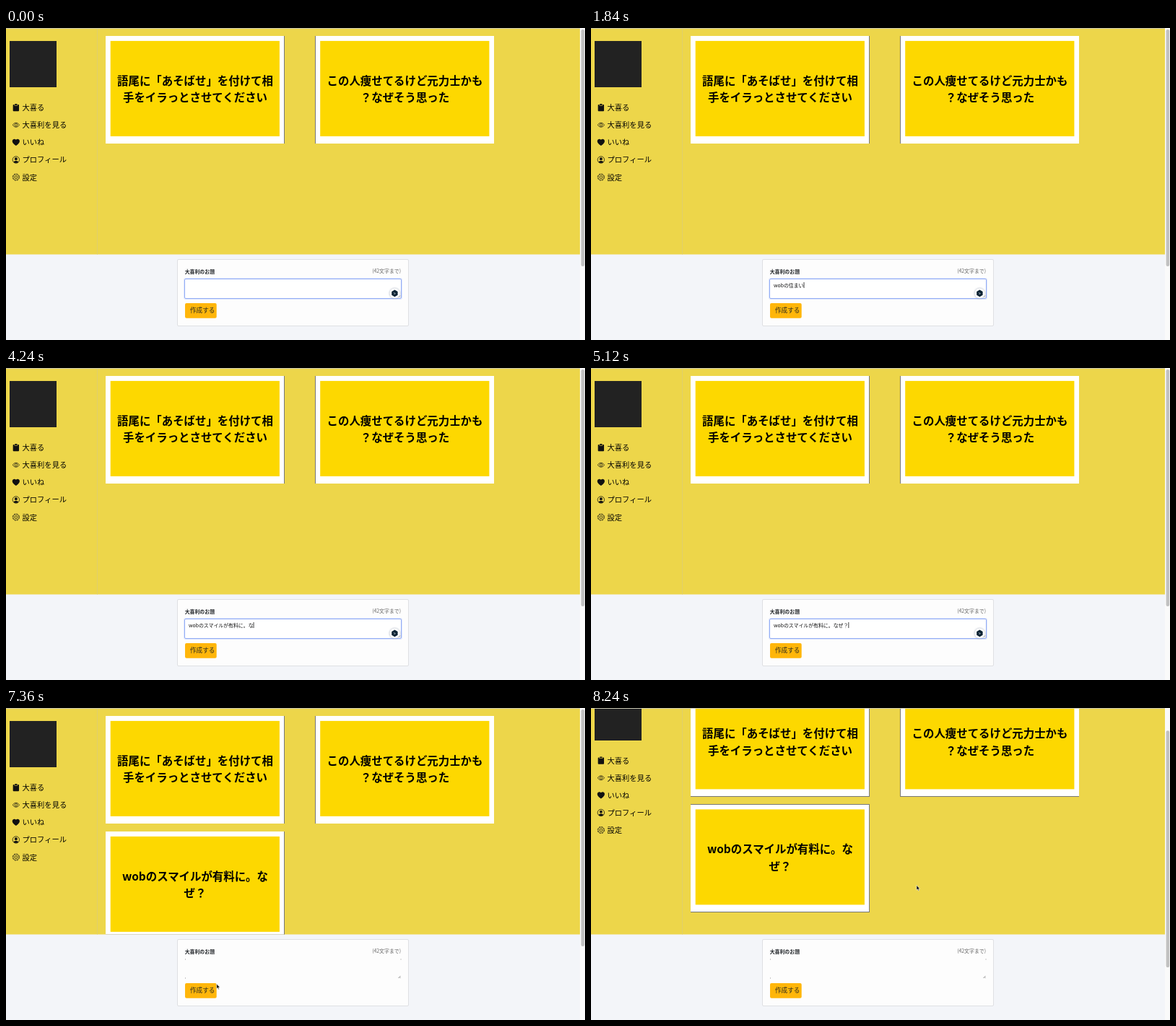
An HTML page that plays this animation: 802 px wide and 432 px high, repeating every 8320 ms.

```html
<!DOCTYPE html>
<html>
<head>
<meta charset="utf-8">
<style>
html, body { margin: 0; width: 100%; height: 100%; overflow: hidden; background: #f3f5f9; }
svg { display: block; font-family: "Noto Sans CJK JP", "Noto Sans CJK", "Noto Sans", sans-serif; }
.title { font-size: 15.43px; font-weight: 700; text-anchor: middle; }
.nav text { font-size: 10.29px; }
.icon { fill: none; stroke: #111; stroke-width: 1.2; }
.solid { fill: #111; stroke: none; }
.small { font-size: 6.9px; }
.crisp { shape-rendering: crispEdges; }
</style>
</head>
<body>
<svg width="802" height="432" viewBox="0 0 802 432">
  <defs>
    <clipPath id="view"><rect width="795" height="313.6"/></clipPath>
    <filter id="soft" x="-50%" y="-50%" width="200%" height="200%"><feGaussianBlur stdDeviation="1"/></filter>
  </defs>

  <g clip-path="url(#view)">
    <rect width="795" height="314" fill="#edd64a"/>
    <path d="M126.5 0V314" stroke="#e0cf6c"/>
    <g id="page">
      <rect class="crisp" x="5" y="17.7" width="65" height="64.6" fill="#222"/>
      <g id="nav" class="nav"></g>
      <g id="cards"></g>
    </g>
  </g>
  <path d="M0 .5H802" stroke="#c6c4b0"/>

  <rect x="795" width="7" height="432" fill="#fafafa"/>
  <rect id="thumb" x="796.6" width="4.6" height="328" rx="2.3" fill="#c1c1c1"/>

  <rect x="237.5" y="320.5" width="320" height="92" rx="1.5" fill="#fdfdfd" stroke="#dfe0e3"/>
  <text class="small" x="247.7" y="340.2" font-weight="700" fill="#212529">大喜利のお題</text>
  <text class="small" x="547" y="338.6" text-anchor="end" fill="#666">(42文字まで)</text>

  <path d="M248 348h1M546.5 348h1M248 374h1M543.5 374l3-3M545.5 374l1-1" stroke="#777" stroke-width=".8"/>
  <g id="focus">
    <rect x="246.5" y="346.5" width="302" height="29" rx="2" fill="none" stroke="#dbe4fd"/>
    <rect x="247.5" y="347.5" width="300" height="27" rx="1.5" fill="#fff" stroke="#93adf4"/>
    <path d="M543.5 373l3-3M545.5 373l1-1" stroke="#777" stroke-width=".6"/>
  </g>
  <text id="typed" class="small" x="253" y="358.5" fill="#111"></text>
  <path id="caret" stroke="#111" stroke-width=".8"/>
  <g id="badge" transform="translate(538.4 367.4)">
    <circle r="7.4" fill="#9aa3b5" opacity=".6" filter="url(#soft)"/>
    <circle r="6.9" fill="#fff"/>
    <path id="hex" d="M0-4.8l4.2 2.4v4.8L0 4.8l-4.2-2.4v-4.8z"/>
    <path d="M-1.6-1L1 .3l-2 1" fill="none" stroke="#dfe6ea" stroke-width=".6"/>
  </g>

  <rect id="ring" x="247" y="380" width="45.6" height="22.6" rx="2.5" fill="none" stroke="#86aef0" stroke-width="1.8"/>
  <rect id="button" x="248" y="381" width="43.7" height="20.8" rx="2"/>
  <text x="255" y="394.4" font-size="8.6" fill="#2a2a20">作成する</text>

  <path id="arrow" d="M0 0V6.6L1.5 5.3L2.5 7.6L3.6 7.1L2.6 4.9H4.6Z" stroke="#fff" stroke-width=".6"/>
  <path id="hand" d="M-1-4q1-1 1.3 .4l.5 2.2q2.8 0 3.8 1.2q.4 2.5-.8 4.2h-3.6q-1.2-2-3-3.8q.5-1 2 .1z" fill="#fff" stroke="#111" stroke-width=".8"/>
</svg>
<script>
const LOOP = 8320, STEP = 80, FOCUS_END = 6640, POSTED = 7200;
const $ = id => document.getElementById(id);
const show = (id, on) => $(id).style.display = on ? "" : "none";

const icons = [
  '<path class="solid" d="M3 1.5h1.5V4h7V1.500H13q1.5 0 1.5 1.5v11.500q0 1.5-1.5 1.5H3q-1.5 0-1.5-1.5V3q0-1.500 1.5-1.500z"/><path class="solid" d="M5.500 0h5v3h-5z"/>',
  '<path d="M.7 8Q8-1.5 15.3 8Q8 17.500 .7 8z"/><circle cx="8" cy="8" r="2.7"/>',
  '<path class="solid" d="M8 15.300C-7 6 3-2.500 8 2.500C13-2.500 23 6 8 15.300z"/>',
  '<circle cx="8" cy="8" r="7.3"/><circle class="solid" cx="8" cy="6" r="3"/><path class="solid" d="M2.500 13q2-3 5.500-3t5.500 3q-5.500 4-11 0z"/>',
  '<circle cx="8" cy="8" r="7.2" stroke-dasharray="3.400 2.255"/><circle cx="8" cy="8" r="6.200" stroke-width=".8"/><circle cx="8" cy="8" r="2.900"/>'
].map(s => s.replace(/(\.\d)00/g, "$1"));
$("nav").innerHTML = ["大喜る", "大喜利を見る", "いいね", "プロフィール", "設定"].map((label, i) => {
  const y = 110.2 + 24.1 * i;
  return `<g class="icon" transform="translate(8.7 ${y - 5.2}) scale(.643)">${icons[i]}</g>
    <text x="22.5" y="${y + 3.9}">${label}</text>`;
}).join("");

const card = (x, y, lines, id) => `<g id="${id}" transform="translate(${x} ${y})">
  <rect class="crisp" width="248.1" height="149.7" fill="#777"/>
  <rect class="crisp" x=".643" y=".643" width="246.8" height="148.4" fill="#fff"/>
  <rect x="7" y="7.3" width="234.2" height="132" fill="#fdd800"/>
  ${lines.map((s, i) => `<text class="title" x="124.3" y="${68.4 + 23.1 * i}">${s}</text>`).join("")}</g>`;
$("cards").innerHTML =
  card(137.7, 10.6, ["語尾に「あそばせ」を付けて相", "手をイラっとさせてください"], "card1") +
  card(428.2, 10.6, ["この人痩せてるけど元力士かも", "？なぜそう思った"], "card2") +
  card(137.7, 170.6, ["wobのスマイルが有料に。な", "ぜ？"], "card3");

// Each edit: time, length kept from the final sentence, pending input
const SENTENCE = "wobのスマイルが有料に。なぜ？";
const edits = [
  [0, 0, ""], [160, 1, ""], [240, 2, ""], [400, 3, ""], [640, 3, "n"], [720, 4, ""],
  [960, 4, "s"], [1040, 4, "す"], [1200, 4, "すm"], [1280, 4, "すま"], [1440, 4, "すまい"],
  [1680, 4, "住まい"], [2000, 4, "すまいr"], [2080, 4, "すまいる"], [2240, 8, ""],
  [2400, 8, "g"], [2480, 9, ""], [2640, 9, "y"], [2720, 9, "ゆ"], [3120, 9, "ゆう"],
  [3200, 9, "ゆうr"], [3280, 9, "ゆうりょ"], [3360, 9, "ゆうりょう"], [3520, 11, ""],
  [3600, 12, ""], [3760, 13, ""], [4240, 14, ""], [4400, 14, "z"], [4480, 15, ""],
  [4720, 16, ""], [POSTED, 0, ""]
];

const path = [[5600, 400, 372], [5920, 290, 405], [6160, 279, 393], [7280, 279, 393], [7760, 451, 245.5]];
function pointer(t) {
  const i = path.findIndex(p => p[0] > t);
  if (i < 0) return path[path.length - 1].slice(1);
  const [a, b] = [path[Math.max(i - 1, 0)], path[i]];
  const u = Math.max(0, (t - a[0]) / (b[0] - a[0])), e = u * u * (3 - 2 * u);
  return [a[1] + (b[1] - a[1]) * e, a[2] + (b[2] - a[2]) * e];
}

function draw(now) {
  const t = Math.floor(now % LOOP / STEP) * STEP;
  const scroll = t < 8000 ? 0 : 3.2 + (t - 8000) / 240 * 34.3;
  $("page").setAttribute("transform", `translate(0 ${-scroll})`);
  $("thumb").setAttribute("y", 2 + scroll * .78);

  const [, kept, pending] = edits.filter(e => e[0] <= t).pop();
  const text = SENTENCE.slice(0, kept) + pending, focused = t < FOCUS_END;
  $("typed").textContent = text;
  const caretX = 253.5 + (text ? $("typed").getComputedTextLength() : 0);
  $("caret").setAttribute("d", `M${caretX} 352V360`);
  show("caret", focused && text);
  show("focus", focused);
  show("badge", t < POSTED);
  $("hex").setAttribute("fill", focused ? "#0b2233" : "#59606a");
  show("card3", t >= POSTED);

  const [x, y] = pointer(t);
  const over = t >= 5600 && x > 248 && x < 291 && y > 381 && y < 401;
  show("ring", !focused && t < POSTED);
  $("button").setAttribute("fill", over ? "#d39a12" : "#ffb60a");
  show("arrow", t >= 5600 && !over);
  show("hand", over);
  for (const id of ["arrow", "hand"]) $(id).setAttribute("transform", `translate(${x} ${y})`);
}

const start = performance.now();
(function frame() {
  draw(performance.now() - start);
  requestAnimationFrame(frame);
})();
</script>
</body>
</html>
```
